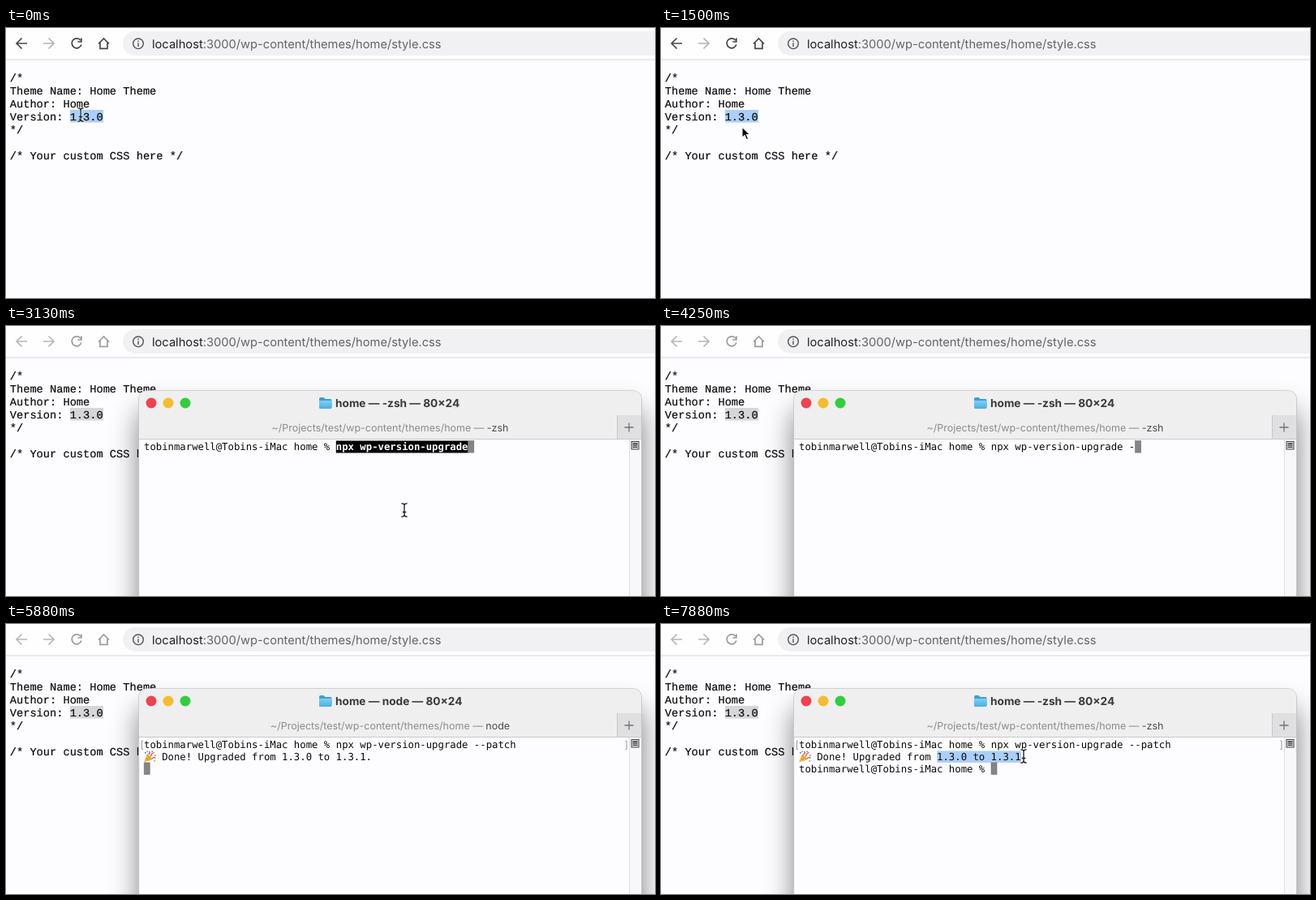
An HTML page that plays this animation: 800 by 333 pixels, repeating every 8000 ms.

```html
<!DOCTYPE html>
<html lang="en">
<head>
<meta charset="utf-8">
<title>Theme version upgrade</title>
<style>
html, body { margin: 0; width: 100%; height: 100%; overflow: hidden; background: #fdfcfe; }
svg { display: block; }
text { white-space: pre; text-rendering: geometricPrecision; }
.ui { font-family: Inter, Roboto, sans-serif; }
.page { font: 13.68px "Liberation Mono", monospace; fill: #0c0c0c; stroke: #0c0c0c; stroke-width: .2; }
.term { font: 12.29px "DejaVu Sans Mono", monospace; fill: #0a0a0a; }
.term .pasted { fill: #fff; font-weight: 700; }
.nav { fill: none; stroke: #48484b; stroke-width: 1.7; }
.nav .off { stroke: #b4b4b7; }
.idle .nav { stroke: #9c9c9f; }
.idle .nav .off, .idle .nav .back { stroke: #b6b6b9; }
.mark { fill: #abcff8; }
.idle .mark { fill: #d6d5d7; }
</style>
</head>
<body>
<svg width="800" height="333" viewBox="0 0 800 333">
  <defs>
    <filter id="shadow" x="-15%" y="-30%" width="130%" height="160%">
      <feGaussianBlur stdDeviation="17"/>
    </filter>
    <linearGradient id="folderFill" x2="0" y2="1">
      <stop stop-color="#7fd0f5"/><stop offset="1" stop-color="#4bade0"/>
    </linearGradient>
    <path id="beamShape" d="M-3.2 -8.2Q0 -8.2 0 -5.5Q0 -8.2 3.2 -8.2M0 -5.5V5.5M-3.2 8.2Q0 8.2 0 5.5Q0 8.2 3.2 8.2M-1.8 2.5H1.8"/>
  </defs>

  <g id="browser">
    <rect width="800" height="333" fill="#fdfcfe"/>
    <rect width="800" height="38.5" fill="#fefefe"/>
    <rect y="38.5" width="800" height="1" fill="#d8d7da"/>
    <rect x="144" y="4" width="700" height="30" rx="15" fill="#f1f0f3"/>
    <g class="nav">
      <path class="back" d="M26 19H13.5M19.5 12.5L13 19L19.5 25.5"/>
      <path class="off" d="M46 19H58.5M52.5 12.5L59 19L52.5 25.5"/>
      <path d="M92 15.2A6 6 0 1 0 92.9 20.6M92.9 12.4V17H88.3"/>
      <path d="M114 19.5L120.5 13L127 19.5M116 18V25.3H125V18"/>
      <g stroke="#55555a" stroke-width="1.4">
        <circle cx="163" cy="19.3" r="6.3"/>
        <path d="M163 18.3V22.9M163 15.5V17"/>
      </g>
    </g>
    <text class="ui" x="180" y="24.6" font-size="14.68" fill="#232326">localhost<tspan fill="#646468">:3000/wp-content/themes/home/style.css</tspan></text>
    <rect class="mark" x="79" y="101" width="41" height="15.5"/>
    <g id="css" class="page"></g>
  </g>

  <g id="window">
    <rect x="164" y="104" width="620" height="290" rx="10" opacity=".5" filter="url(#shadow)"/>
    <rect x="163.7" y="79.7" width="619.8" height="300" rx="10.3" fill="#fdfcfe" stroke="#bdbcbe" stroke-width=".8"/>
    <path d="M164 139V90A10 10 0 0 1 174 80H773A10 10 0 0 1 783 90V139Z" fill="#f0eff0"/>
    <path d="M753 110H783V139H753Z" fill="#e0dfe1"/>
    <path d="M753.5 110V139M164 139.5H783" stroke="#c9c8ca"/>
    <path d="M762.5 125H773.5M768 119.5V130.5" stroke="#737275" stroke-width="1.3"/>
    <circle cx="179" cy="95" r="6.5" fill="#ed444f"/>
    <circle cx="200" cy="95" r="6.5" fill="#f6bc2f"/>
    <circle cx="221" cy="95" r="6.5" fill="#2fcf3d"/>
    <path d="M386 90Q386 88 388 88H391.5L393.5 90H400Q401.5 90 401.5 92V100Q401.5 102 399.5 102H388Q386 102 386 100Z" fill="#3f9fd3"/>
    <path d="M386 92H401.5V100Q401.5 102 399.5 102H388Q386 102 386 100Z" fill="url(#folderFill)"/>
    <text id="title" class="ui" x="406" y="99.7" font-size="13.68" font-weight="700" fill="#3a393b"></text>
    <text class="ui" x="473.5" y="129.7" font-size="12.5" text-anchor="middle" fill="#8b8a8d">~/Projects/test/wp-content/themes/home — <tspan id="tab" fill="#4b4a4d"></tspan></text>
    <path d="M768 140H783V333H768Z" fill="#f8f7f9"/>
    <path d="M768.5 140V333" stroke="#dfdee0"/>
    <rect x="771" y="142.5" width="9" height="9.5" fill="#e4e3e5" stroke="#444"/>
    <path d="M772.5 145H778.5M772.5 147.2H778.5M772.5 149.4H778.5" stroke="#333" stroke-width="1.3"/>
    <path id="brackets" d="M169 144H167.5V154.5H169M763.5 144H765V154.5H763.5" fill="none" stroke="#98979a"/>
    <rect id="paste" x="406.8" y="141.5" width="162.8" height="15" fill="#000"/>
    <rect id="picked" x="340.2" y="156.5" height="14.5" fill="#abcff8"/>
    <rect id="block" width="7" height="14.5" fill="#858486" stroke="#6f6e70" stroke-width=".6"/>
    <g class="term">
      <text id="prompt" x="170" y="153.3"></text>
      <text id="command" x="406.8" y="153.3"></text>
      <g id="done">
        <path d="M170 170.5L174.3 160L181 166.8Z" fill="#f0b93a"/>
        <path d="M172.2 165.3L176.5 168.5M173.7 161.8L179 167.4" stroke="#c98221"/>
        <path d="M175.5 161Q178 160 176.8 156.8M178.5 163.5Q178.5 160 182.5 158.5M180 166Q182 163.5 184.5 165.5" fill="none" stroke="#d9483b" stroke-width="1.3"/>
        <path d="M171 158h1.8v1.8h-1.8zM179.5 156.5h1.6v1.6h-1.6zM183 161.5h1.6v1.6h-1.6z" fill="#4a93d8"/>
        <path d="M173.5 156.5h1.5v1.5h-1.5zM182.5 168.3h1.5v1.5h-1.5z" fill="#57ad55"/>
        <text x="192.2" y="168">Done! Upgraded from 1.3.0 to 1.3.1.</text>
      </g>
      <text id="prompt2" x="170" y="182.8"></text>
    </g>
  </g>

  <g id="mouse">
    <g id="beam" fill="none" stroke-linecap="round">
      <use href="#beamShape" stroke="#fff" stroke-opacity=".8" stroke-width="2.6"/>
      <use href="#beamShape" stroke="#1b1b1b" stroke-width="1.3"/>
    </g>
    <path id="arrow" d="M0 0V13.3L3.1 10.5L5.3 15.8L7.7 14.8L5.5 9.6H9.7Z" fill="#080808" stroke="#fff" stroke-width="1.1"/>
  </g>
</svg>
<script>
const LOOP = 8000, STEP = 125, CELL = 7.4, LEFT = 170, INPUT = 406.8;
const PROMPT = "tobinmarwell@Tobins-iMac home % ";
const COMMAND = "npx wp-version-upgrade --patch";
const PASTE = 3125, PASTED = 22, ENTER = 5500;
const KEYS = [3625, 4250, 4375, 4625, 4750, 4875, 5000, 5250];
const CSS = ["/*", "Theme Name: Home Theme", "Author: Home", "Version: 1.3.0", "*/", "", "/* Your custom CSS here */"];

// pointer way points: ms, x, y
const PATH = [
  [0, 92, 107], [250, 67, 142], [500, 200, 182], [625, 286, 112], [750, 190, 26], [875, 104, 113],
  [1000, 108, 118], [1125, 109, 123], [1250, 104, 125], [1375, 98, 122], [1500, 100, 122],
  [2000, 100, 122], [2375, 340, 190], [2625, 491, 227],
  [6125, 491, 227], [6375, 668, 244], [6625, 480, 190], [6875, 330, 164], [7000, 308, 162],
  [7250, 340, 163], [7875, 447, 163], [LOOP, 447, 163]
];

const $ = id => document.getElementById(id);
const show = (id, on) => $(id).style.display = on ? "" : "none";
const write = (id, text) => { if ($(id).textContent !== text) $(id).textContent = text; };

CSS.forEach((line, i) => {
  const el = document.createElementNS("http://www.w3.org/2000/svg", "text");
  el.setAttribute("x", 4.8);
  el.setAttribute("y", 65.7 + i * 16);
  el.textContent = line;
  $("css").append(el);
});
write("prompt", PROMPT);
write("prompt2", PROMPT);

function pointerAt(t) {
  const i = PATH.findIndex(p => p[0] > t);
  const [t0, x0, y0] = PATH[i - 1], [t1, x1, y1] = PATH[i];
  const f = (t - t0) / (t1 - t0);
  return [x0 + (x1 - x0) * f, y0 + (y1 - y0) * f];
}

function draw(t) {
  const entered = t >= ENTER, done = t >= 5875, ready = t >= 6000;
  const typed = t < PASTE ? 0 : PASTED + KEYS.filter(k => t >= k).length;
  const pasted = t >= PASTE && t < KEYS[0];
  const job = t >= 5625 && t < 6250 ? "node" : "-zsh";

  $("browser").setAttribute("class", t >= 2125 ? "idle" : "");
  show("window", t >= 2250);
  write("title", `home — ${job} — 80×24`);
  write("tab", job);

  show("paste", pasted);
  write("command", COMMAND.slice(0, typed));
  $("command").setAttribute("class", pasted ? "pasted" : "");
  show("brackets", entered);
  show("done", done);
  show("prompt2", ready);

  const row = done ? 2 : entered ? 1 : 0;
  const col = entered && !ready ? LEFT : INPUT + (ready ? 0 : typed * CELL);
  $("block").setAttribute("x", col + .2);
  $("block").setAttribute("y", 141.6 + row * 14.7);

  const [x, y] = pointerAt(t);
  const arrow = t >= 875 && t < 2250;
  show("mouse", t < KEYS[0] || t >= 6250);
  show("arrow", arrow);
  show("beam", !arrow);
  $("mouse").setAttribute("transform", `translate(${x} ${y})`);

  const cells = t > 7250 ? Math.max(0, Math.min(14, Math.round((x - 340.2) / CELL))) : 0;
  $("picked").setAttribute("width", cells * CELL);
}

const start = performance.now();
function tick() {
  const t = (performance.now() - start) % LOOP;
  draw(Math.floor(t / STEP) * STEP);
  requestAnimationFrame(tick);
}
tick();
</script>
</body>
</html>
```
